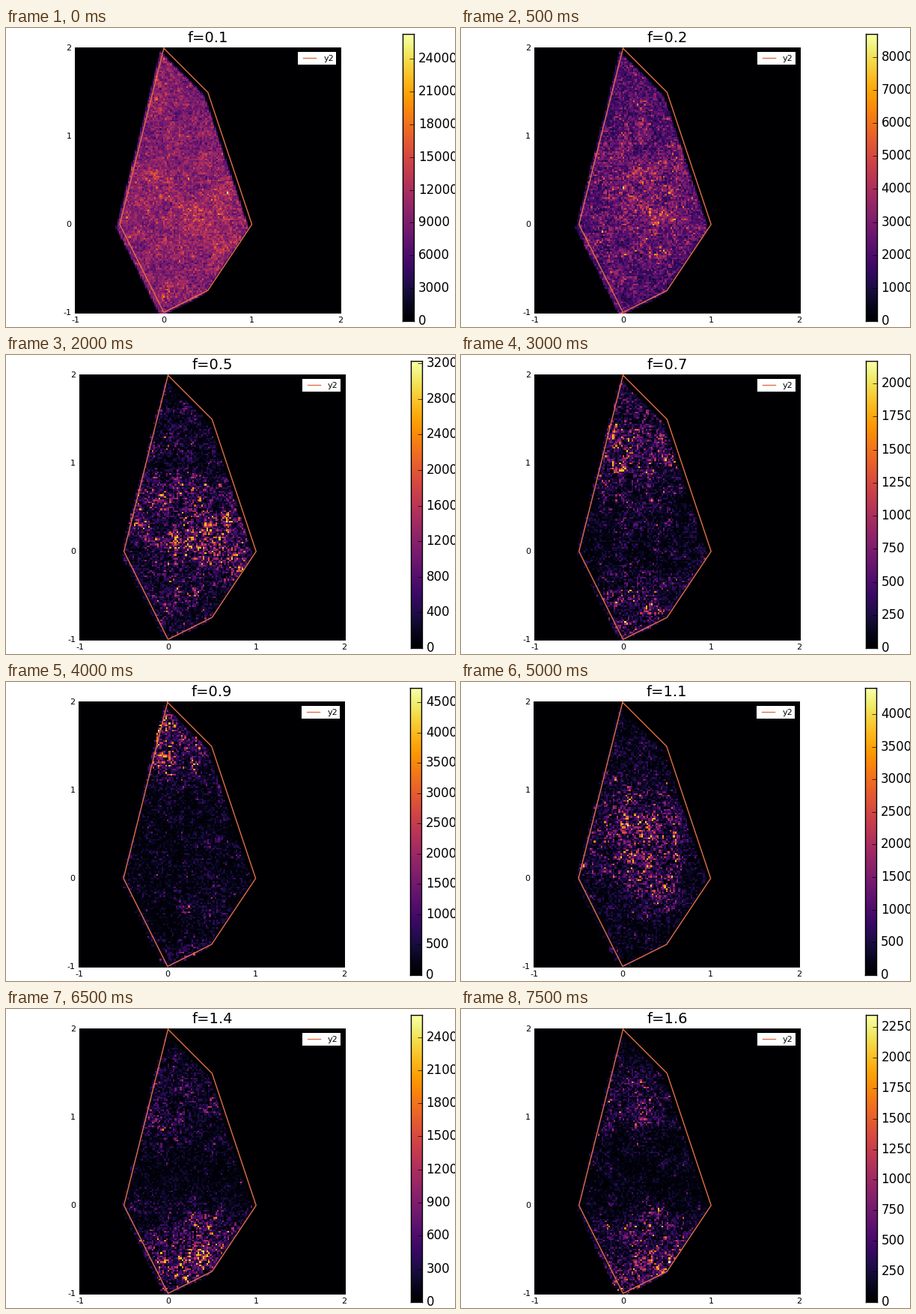
Recreate the animation shown at these times as a matplotlib script. Size 600 by 400 pixels, loop 8000 ms.

```python
import numpy as np
import matplotlib.pyplot as plt
from matplotlib.animation import FuncAnimation

W, H, DPI = 600, 400, 100
ORANGE = "#e26f46"
plt.rcParams["font.family"] = "DejaVu Sans"

CELL = 0.02
GRID = np.linspace(-1, 2, 151)
X, Y = np.meshgrid(GRID, GRID)
POLY = np.array([(0, 2), (0.5, 1.5), (1, 0), (0.5, -0.75), (0, -1), (-0.5, 0)])
SHIFT = -0.04
CENTRE = np.array([0.2, 0.3])

# largest bin count for f = 0.1, 0.2, ...
VMAX = [26263, 8700, 5092, 3700, 3228, 2650, 2170, 2268,
        4735, 3700, 4400, 4010, 2946, 2600, 2450, 2348]
N = len(VMAX)

# path of the densest spot: f, x, y
HOT = np.array([(0.1, 0.68, 0.1), (0.3, 0.2, 0.7), (0.5, 0.6, 0.25),
                (0.7, 0.1, 1.2), (0.9, 0.08, 1.65), (1.3, 0.3, -0.6),
                (1.6, 0.3, -0.65)])


def coverage():
    """Share of each cell lying inside the shifted polygon."""
    cov = np.ones_like(X)
    for (x0, y0), (x1, y1) in zip(POLY + SHIFT, np.roll(POLY, -1, 0) + SHIFT):
        dx, dy = x1 - x0, y1 - y0
        dist = ((X - x0) * dy - (Y - y0) * dx) / np.hypot(dx, dy)
        cov = np.minimum(cov, np.clip(0.5 - dist / CELL * np.sign(dist_sign), 0, 1))
    return cov


# the vertices run clockwise, so the inside lies on the positive side
dist_sign = -1
COVER = coverage()


def bump(centre, radius):
    x, y = centre
    return np.exp(-((X - x) ** 2 + (Y - y) ** 2) / (2 * radius ** 2))


def lumps(rng, radius):
    """Smooth unit-variance noise."""
    k = np.fft.fftfreq(len(GRID))
    low = np.exp(-2 * (np.pi * radius) ** 2 * (k[:, None] ** 2 + k ** 2))
    z = np.fft.ifft2(np.fft.fft2(rng.standard_normal(X.shape)) * low).real
    return z / z.std()


def density(f):
    """Bin counts relative to the fullest bin; sparser and patchier as f grows."""
    rng = np.random.default_rng(round(f * 10))
    hot = np.array([np.interp(f, HOT[:, 0], col) for col in HOT.T[1:]])
    base = 0.04 + 0.33 * np.exp((0.1 - f) / 0.2)
    height = 0.25 - 0.17 * np.exp((0.1 - f) / 0.3)
    shape = 1.4 + 28 * np.exp((0.1 - f) / 0.08)
    mean = base + height * (bump(hot, 0.35) + 0.4 * bump(2 * CENTRE - hot, 0.3))
    spread = 0.35 / np.sqrt(shape)
    mean *= np.exp(spread * (lumps(rng, 3) + lumps(rng, 0.8)) - spread ** 2)
    v = mean * rng.gamma(shape, 1 / shape, X.shape) * COVER
    peak = v.argmax()
    v = np.minimum(v, 0.85)
    v.flat[peak] = 1
    return v


def ticks_for(vmax):
    """Ticks at the smallest round step giving at most ten intervals."""
    mag = 10 ** np.floor(np.log10(vmax / 10))
    step = next(m * mag for m in (1, 2, 2.5, 3, 4, 5, 6, 8, 10)
                if vmax / (m * mag) <= 10)
    return np.arange(0, vmax, step)


def layout(top_label):
    """Left edges of plot and colour bar; wider labels push both left."""
    if len(top_label) > 4:
        return 92, 530.3
    return (97, 540.3) if top_label[0] == "4" else (97.6, 541)


def box(x, y, w, h):
    return [x / W, 1 - (y + h) / H, w / W, h / H]


MAPS = [density((i + 1) / 10) for i in range(N)]

fig = plt.figure(figsize=(W / DPI, H / DPI), dpi=DPI, facecolor="white")

ax = fig.add_axes(box(92, 26, 355.5, 355.7))
lim = (-1 - CELL / 2, 2 + CELL / 2)
heat = ax.imshow(MAPS[0], cmap="inferno", vmin=0, vmax=1, origin="lower",
                 extent=lim * 2, interpolation="nearest", aspect="auto")
ring = np.vstack([POLY, POLY[:1]])
ax.plot(ring[:, 0], ring[:, 1], color=ORANGE, lw=1)
ax.set(xlim=lim, ylim=lim, facecolor="black")
names = ["-1", "0", "1", "2"]
ax.set_xticks(range(-1, 3), names)
ax.set_yticks(range(-1, 3), names, va="center")
ax.tick_params(length=0, pad=3.2, labelsize=8)
ax.spines[:].set_visible(False)
title = ax.set_title("", fontsize=14, pad=5, y=1)

key = fig.add_axes(box(390, 32, 51, 17), facecolor="white")
key.set(xlim=(0, 51), ylim=(17, 0), xticks=[], yticks=[])
key.spines[:].set_visible(False)
key.plot([7, 24], [8, 8], color=ORANGE, lw=1)
key.text(34.5, 12.2, "y2", fontsize=8)

bar = fig.add_axes(box(530.3, 8, 15, 384))
ramp = bar.imshow(np.arange(256)[:, None], cmap="inferno", origin="lower",
                  aspect="auto", extent=(0, 1, 0, 1))
bar.set_xticks([])
bar.yaxis.tick_right()
bar.tick_params(axis="y", direction="in", length=4, width=0.5, pad=4, labelsize=12)
bar.spines[:].set_linewidth(1)


def draw(i):
    top = VMAX[i]
    ticks = ticks_for(top)
    labels = [f"{t:.0f}" for t in ticks]
    left, bar_left = layout(labels[-1])
    ax.set_position(box(left, 26, 355.5, 355.7))
    key.set_position(box(left + 298, 32, 51, 17))
    bar.set_position(box(bar_left, 8, 15, 384))
    heat.set_data(MAPS[i])
    title.set_text(f"f={(i + 1) / 10:.1f}")
    ramp.set_extent((0, 1, 0, top))
    bar.set_ylim(0, top)
    bar.set_yticks(ticks, labels, va="center")
    return heat, title


anim = FuncAnimation(fig, draw, frames=N, interval=500, repeat=True,
                     repeat_delay=0, blit=False)
plt.show()
```
